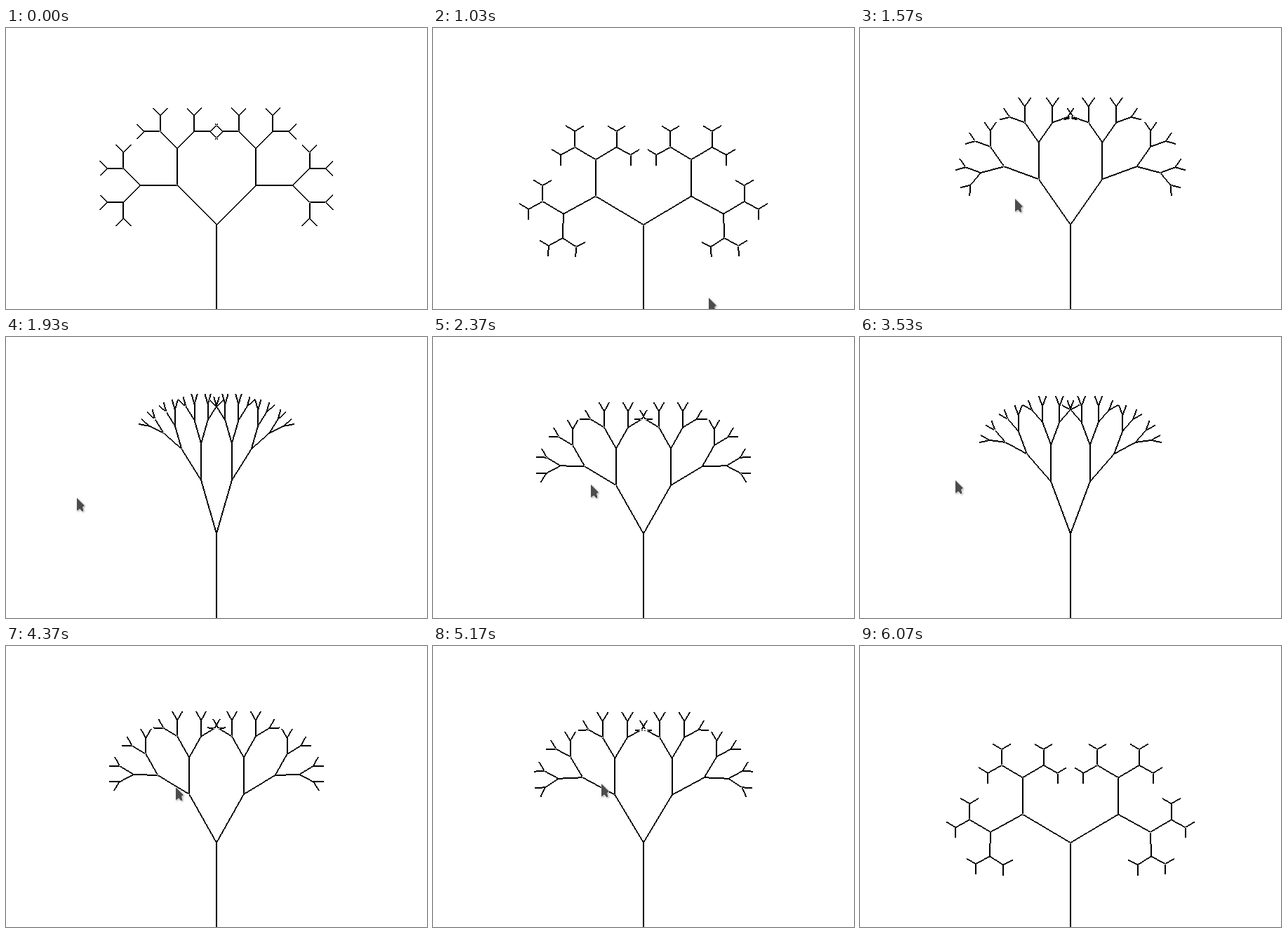
Recreate the animation shown at these times as an HTML page. Size 600 by 400 pixels, loop 6910 ms.

```html
<!DOCTYPE html>
<html lang="en">
<head>
<meta charset="utf-8">
<title>Branching tree</title>
<style>
  html, body { margin: 0; width: 100%; height: 100%; overflow: hidden; background: #fff; }
  svg { display: block; width: 600px; height: 400px; }
  #tree { shape-rendering: crispEdges; }
  #pointer { fill: #4c4c4c; filter: drop-shadow(1px 1.5px 1px rgba(0, 0, 0, .3)); }
</style>
</head>
<body>
<svg viewBox="0 0 600 400">
  <path id="tree"/>
  <path id="pointer" stroke="#fff" paint-order="stroke"
        d="M0 0V18.6L4.2 15.6L7.6 19.6L9.4 18.6L8.2 13L11 11Z"/>
</svg>
<script>
const LOOP = 6910, ENTER = 900, EXIT = 5500, LAG = 30;
const SHRINK = 0.66, SHORTEST = 15, REST_X = 300;

// Turning points of the hand: [time in ms, position]
const swings = [
  [930, 398], [2120, 81], [2684, 431], [3530, 136], [3710, 208], [4226, 81],
  [4450, 305], [4880, 143], [5000, 158], [5054, 158], [5345, 396]
];
const heights = [[900, 398], [1570, 243], [2370, 210], [4370, 201], [5170, 196], [5500, 400]];

const tree = document.getElementById('tree');
const pointer = document.getElementById('pointer');

// Cosine easing from one turning point to the next
function swing(points, time) {
  const next = points.findIndex(([at]) => at > time);
  if (next === 0) return points[0][1];
  if (next < 0) return points[points.length - 1][1];
  const [t0, p0] = points[next - 1], [t1, p1] = points[next];
  return p0 + (p1 - p0) * (1 - Math.cos(Math.PI * (time - t0) / (t1 - t0))) / 2;
}

// An aliased line: two pixels wide across its steeper axis
function line(x1, y1, x2, y2) {
  const steep = Math.abs(y2 - y1) >= Math.abs(x2 - x1);
  const [dx, dy] = steep ? [1, 0] : [0, 1];
  const corners = [[x1 - dx, y1 - dy], [x1 + dx, y1 + dy], [x2 + dx, y2 + dy], [x2 - dx, y2 - dy]];
  return 'M' + corners.map(corner => corner.map(n => n.toFixed(2)).join(' ')).join('L') + 'Z';
}

function branch(x, y, length, heading, spread) {
  const x2 = x + length * Math.sin(heading), y2 = y - length * Math.cos(heading);
  const next = length * SHRINK;
  const twigs = next > SHORTEST ? [1, -1] : [];
  return line(x, y, x2, y2)
    + twigs.map(side => branch(x2, y2, next, heading + side * spread, spread)).join('');
}

// Thirty pictures a second, on a grid of 10 ms
function step(time) {
  const rest = time % 100;
  return time - rest + (rest < 30 ? 0 : rest < 70 ? 30 : 70);
}

function draw() {
  const time = step(performance.now() % LOOP);
  const seen = time - LAG;
  const mouseX = seen < ENTER ? REST_X : swing(swings, seen);
  tree.setAttribute('d', branch(300, 400, 120, 0, mouseX / 600 * Math.PI / 2));

  const inside = time >= ENTER && time < EXIT;
  pointer.setAttribute('visibility', inside ? 'visible' : 'hidden');
  pointer.setAttribute('transform',
    `translate(${Math.round(swing(swings, time))} ${Math.round(swing(heights, time))})`);
  requestAnimationFrame(draw);
}
draw();
</script>
</body>
</html>
```
